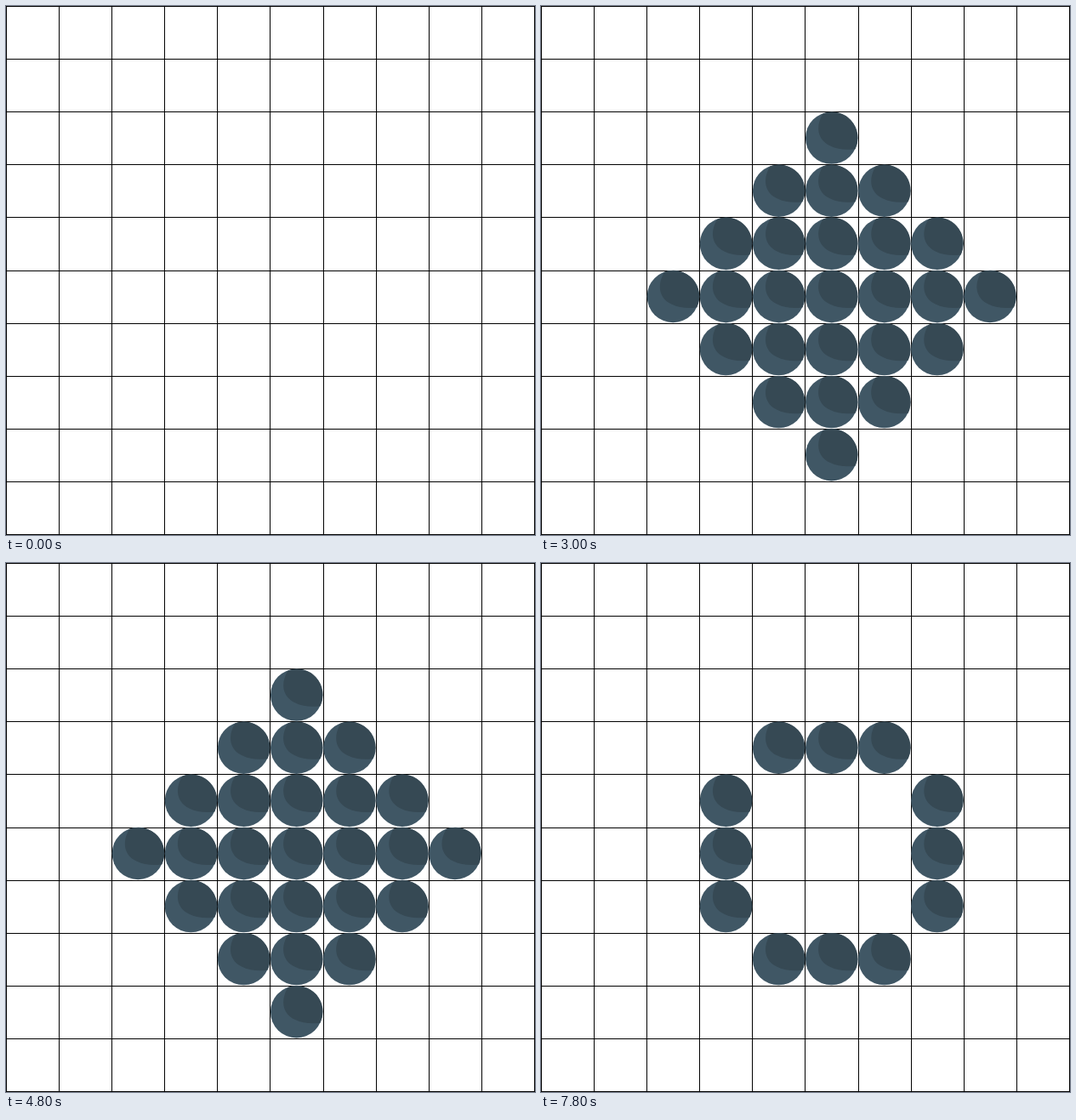
Animation, 622 px wide and 622 px high, one loop 8000 ms. Source, as an HTML page without scripts:

```html
<!DOCTYPE html>
<html lang="en">
<head>
<meta charset="utf-8">
<title>Stones on a grid</title>
<style>
html, body { margin: 0; width: 100%; height: 100%; overflow: hidden; background: #fff; }
svg { display: block; width: 622px; height: 622px; }
.grid { stroke: #000; fill: none; shape-rendering: crispEdges; }
.ring { visibility: hidden; animation: 8s step-end infinite; }
.center { animation-name: center; }
.sides { animation-name: sides; }
.corners { animation-name: corners; }
.tips { animation-name: tips; }
.shoulders { animation-name: shoulders; }
.far-corners { animation-name: far-corners; }
.far-tips { animation-name: far-tips; }
.far-sides { animation-name: far-sides; }

/* one step is 600 ms = 7.5% */
@keyframes center { 7.5% { visibility: visible } 82.5%, 100% { visibility: hidden } }
@keyframes sides { 7.5%, 90% { visibility: visible } 82.5%, 97.5%, 100% { visibility: hidden } }
@keyframes corners { 22.5% { visibility: visible } 97.5%, 100% { visibility: hidden } }
@keyframes tips { 15%, 82.5% { visibility: visible } 75%, 100% { visibility: hidden } }
@keyframes shoulders { 30%, 97.5% { visibility: visible } 67.5%, 100% { visibility: hidden } }
@keyframes far-tips { 37.5% { visibility: visible } 67.5%, 100% { visibility: hidden } }
@keyframes far-sides { 45% { visibility: visible } 60%, 100% { visibility: hidden } }
@keyframes far-corners { 52.5% { visibility: visible } 60%, 100% { visibility: hidden } }
</style>
</head>
<body>
<svg viewBox="0 0 622 622">
  <defs>
    <g id="stone">
      <circle r="30.6" fill="#405765"/>
      <path d="M-10-29C-19-14-17 2-2 9C8 14 18 14 28 13A30.6 30.6 0 0 0-10-29Z" fill="#364954"/>
    </g>
    <!-- mirrored pairs, one to three columns from the middle -->
    <g id="near"><use href="#stone" x="-62.1"/><use href="#stone" x="62.1"/></g>
    <g id="mid"><use href="#stone" x="-124.2"/><use href="#stone" x="124.2"/></g>
    <g id="far"><use href="#stone" x="-186.3"/><use href="#stone" x="186.3"/></g>
  </defs>

  <path class="grid" d="M.5 0V622M62.5 0V622M124.5 0V622M186.5 0V622M248.5 0V622M310.5 0V622M373.5 0V622M435.5 0V622M497.5 0V622M559.5 0V622M621.5 0V622
    M0 .5H622M0 62.5H622M0 124.5H622M0 186.5H622M0 248.5H622M0 311.5H622M0 373.5H622M0 435.5H622M0 497.5H622M0 559.5H622M0 621.5H622"/>

  <g transform="translate(341.55 341.55)">
    <g class="ring center"><use href="#stone"/></g>
    <g class="ring sides">
      <use href="#near"/><use href="#stone" y="-62.1"/><use href="#stone" y="62.1"/>
    </g>
    <g class="ring corners"><use href="#near" y="-62.1"/><use href="#near" y="62.1"/></g>
    <g class="ring tips">
      <use href="#mid"/><use href="#stone" y="-124.2"/><use href="#stone" y="124.2"/>
    </g>
    <g class="ring shoulders">
      <use href="#near" y="-124.2"/><use href="#near" y="124.2"/>
      <use href="#mid" y="-62.1"/><use href="#mid" y="62.1"/>
    </g>
    <g class="ring far-corners"><use href="#mid" y="-124.2"/><use href="#mid" y="124.2"/></g>
    <g class="ring far-tips">
      <use href="#far"/><use href="#stone" y="-186.3"/><use href="#stone" y="186.3"/>
    </g>
    <g class="ring far-sides">
      <use href="#near" y="-186.3"/><use href="#near" y="186.3"/>
      <use href="#far" y="-62.1"/><use href="#far" y="62.1"/>
    </g>
  </g>
</svg>
</body>
</html>
```
